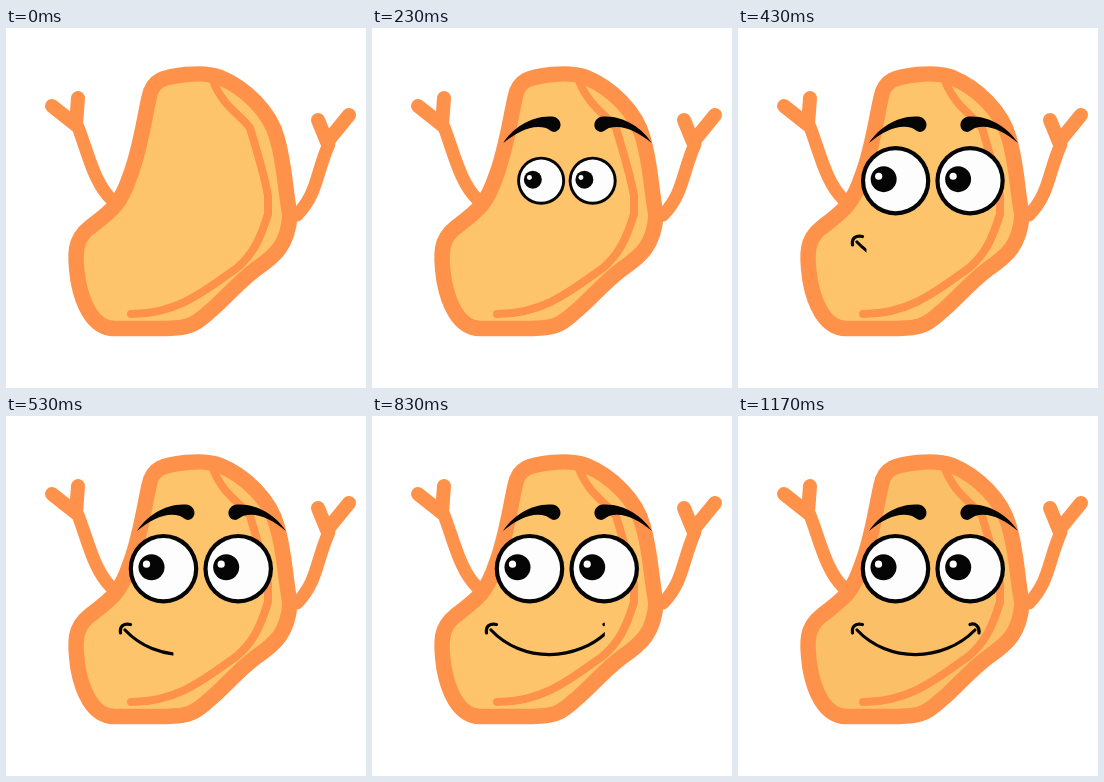
An HTML page with a canvas that plays this animation: 360 by 360 pixels, repeating every 5010 ms.

```html
<!DOCTYPE html>
<html lang="en">
<head>
<meta charset="utf-8">
<title>Happy bean</title>
<style>
  html, body { margin: 0; width: 100%; height: 100%; overflow: hidden; background: #fff; }
  canvas { display: block; width: 360px; height: 360px; }
</style>
</head>
<body>
<canvas id="stage" width="360" height="360"></canvas>
<script>
const ctx = document.getElementById('stage').getContext('2d');
const LOOP = 5010;
const ORANGE = '#ff924b';
const INK = '#050505';
const MID = 205.5; // mirror axis of the brows

const body = new Path2D(`M143 70 C146 51 158 49 180 46.5 Q201 44.5 213 49
  C240 60 264 84 271 110 C279 137 279 162 284 187 C282 217 269 228 250 241
  C230 256 214 276 203 284 C186 300 178 300 160 300.5 L108 300.5
  C86 300 76 274 72 252 C68 225 69 211 83 200 C105 183 114 178 124 148
  C134 122 138 92 143 70 Z`);
const shade = new Path2D(`M207 53 C218 80 234 86 244 100 C250 120 258 145 262 168
  L262 186 C254 212 247 226 231 240 C200 262 172 286 125 286`);
const arms = new Path2D('M72 99 C82 125 88 155 106 172 M291 187 C312 165 310 145 323 116');
const fingers = new Path2D('M46 78 L70 97 L72 70 M312 92 L321 114 L343 87');
const brow = new Path2D(`M131 115 C140 100 160 87 180 88.5 C190 89.5 191 101 184 103.5
  C180 105 178 102 174 100 C160 96 146 103 131 115 Z`);
const mouth = new Path2D(`M119 214 C150 247 205 246.5 237 214
  M114.5 217 C113.5 210 118 207 124.5 208.5 M232 208.5 C237 206 242 211 241 217`);

const clamp = u => Math.min(1, Math.max(0, u));

// Springy scale from 0 to 1 with a small overshoot
function pop(t, start) {
  const u = clamp((t - start) / 340);
  return 1 - (1 - u) ** 4.5 * Math.cos(u * 2.6 * Math.PI);
}

function wipe(t, start, length) {
  return 1 - (1 - clamp((t - start) / length)) ** 2.5;
}

function stroke(path, width, color) {
  ctx.lineWidth = width;
  ctx.strokeStyle = color;
  ctx.stroke(path);
}

function disc(x, y, r, color) {
  ctx.fillStyle = color;
  ctx.beginPath();
  ctx.arc(x, y, r, 0, Math.PI * 2);
  ctx.fill();
}

function scaled(sx, sy, x, y, paint) {
  ctx.save();
  ctx.translate(x, y);
  ctx.scale(sx, sy);
  ctx.translate(-x, -y);
  paint();
  ctx.restore();
}

function eye(x, y) {
  disc(x, y, 34.8, INK);
  disc(x, y, 30.6, '#fdfdfd');
  disc(x - 12, y - 1.5, 13, INK);
  disc(x - 17, y - 4.5, 3.6, '#fff');
}

function drawBean(t) {
  stroke(arms, 13, ORANGE);
  stroke(fingers, 14, ORANGE);
  ctx.fillStyle = t < 1170 ? '#fec46b' : '#fbbf68';
  ctx.fill(body);
  stroke(shade, 8, ORANGE);
  stroke(body, 15.5, ORANGE);
}

function drawFace(t) {
  const b = pop(t, 20);
  ctx.fillStyle = INK;
  for (const side of [-1, 1]) {
    scaled(b * side, b, MID, 104, () => ctx.fill(brow));
  }

  const e = pop(t, 190);
  scaled(e, e, 195, 152.7, () => {
    for (const x of [157.5, 232.2]) eye(x, 152.7);
  });

  ctx.save();
  ctx.beginPath();
  ctx.rect(112, 200, 132 * wipe(t, 395, 695), 50);
  ctx.clip();
  stroke(mouth, 3.2, INK);
  ctx.restore();
}

function draw(t) {
  ctx.fillStyle = '#fff';
  ctx.fillRect(0, 0, 360, 360);
  ctx.lineCap = ctx.lineJoin = 'round';
  drawBean(t);
  drawFace(t);
}

const start = performance.now();
function tick() {
  draw((performance.now() - start) % LOOP);
  requestAnimationFrame(tick);
}
tick();
</script>
</body>
</html>
```
